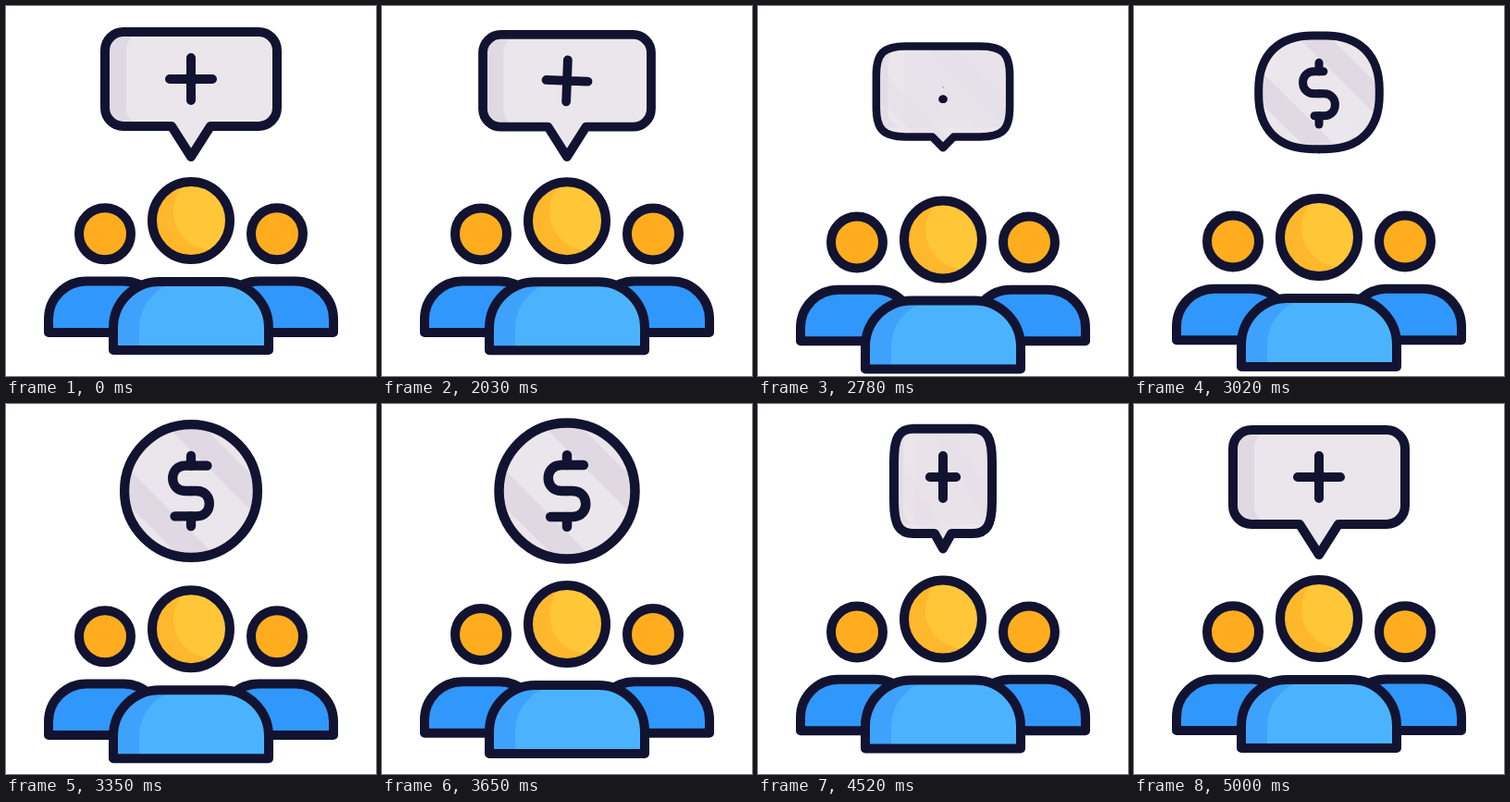
Write an HTML page with a canvas that moves like this. It is 400 by 400 pixels and loops after 5030 ms.

```html
<!DOCTYPE html>
<html lang="en">
<head>
<meta charset="utf-8">
<title>Crowd funding icon</title>
<style>
  html, body { margin: 0; width: 100%; height: 100%; overflow: hidden; background: #fff; }
  canvas { display: block; width: 400px; height: 400px; }
</style>
</head>
<body>
<canvas id="stage"></canvas>
<script>
const LOOP = 5030, REST = 2000, STEP = 30, EDGE_ON = 2325;
const INK = '#121331', PALE = '#ebe6ec', SHADE = '#e0d9e4';
const canvas = document.getElementById('stage');
const ctx = canvas.getContext('2d');
const dpr = window.devicePixelRatio || 1;
canvas.width = canvas.height = 400 * dpr;

const mix = (a, b, u) => a + (b - a) * u;
const smooth = u => u * u * (3 - 2 * u);
const easeOut = u => 1 - (1 - u) * (1 - u);

// cubic-bezier(x1, 0, x2, 1)
function settle(u, x1 = 0.38, x2 = 0.2) {
  let lo = 0, hi = 1, k = 0.5;
  for (let i = 0; i < 24; i++) {
    k = (lo + hi) / 2;
    const x = 3 * (1 - k) ** 2 * k * x1 + 3 * (1 - k) * k * k * x2 + k ** 3;
    if (x < u) lo = k; else hi = k;
  }
  return smooth(k);
}

// keys: [time, value, easing towards this key]
function track(keys, t) {
  if (t <= keys[0][0]) return keys[0][1];
  for (let i = 1; i < keys.length; i++) {
    const [t0, v0] = keys[i - 1], [t1, v1, ease = smooth] = keys[i];
    if (t <= t1) return mix(v0, v1, ease((t - t0) / (t1 - t0)));
  }
  return keys[keys.length - 1][1];
}

const DROP = [[0, 0], [540, 21], [3000, 0, settle]];
const SCALE = [[0, 1], [120, 0.95, easeOut], [540, 1.07], [780, 0.85],
               [1500, 1.05], [1650, 1.05], [2160, 1]];
const ROUND = [[540, 0], [1140, 1], [2200, 1], [2700, 0]];
const TILT = [[0, 0], [120, 5, easeOut], [540, -4.7], [800, -45], [810, 0]];
const PLUS = [[560, 1], [800, 0], [2300, 0], [EDGE_ON, 1]];
const TRIM = [[760, 0], [1110, 1]];
const TURN = [[1650, 0], [3000, Math.PI]];

function outline(path, width = 10) {
  ctx.lineWidth = width;
  ctx.strokeStyle = INK;
  ctx.stroke(path);
}

function part(path, fill, light, lightFill) {
  ctx.fillStyle = fill;
  ctx.fill(path);
  if (light) {
    ctx.save();
    ctx.clip(path);
    ctx.fillStyle = lightFill;
    ctx.fill(light);
    ctx.restore();
  }
  outline(path);
}

function disc(x, y, r) {
  const p = new Path2D();
  p.arc(x, y, r, 0, Math.PI * 2);
  return p;
}

const torso = (x0, x1, top, bottom, r) => new Path2D(
  `M${x0} ${bottom}V${top + r}A${r} ${r} 0 0 1 ${x0 + r} ${top}H${x1 - r}` +
  `A${r} ${r} 0 0 1 ${x1} ${top + r}V${bottom}Z`);

const sideParts = [107, 293].map(x => [disc(x, 246.3, 28), torso(x - 61, x + 61, 297.5, 353, 41)]);
const head = disc(200, 232, 42), headLight = disc(223, 222, 42);
const body = torso(116, 284, 298, 372, 50), bodyLight = torso(144, 330, 298, 372, 50);

function people(drop) {
  ctx.save();
  ctx.translate(0, drop * 0.45);
  for (const [face, chest] of sideParts) {
    part(chest, '#3097fc');
    part(face, '#ffad1f');
  }
  ctx.restore();
  ctx.save();
  ctx.translate(0, drop);
  part(body, '#3ea1fc', bodyLight, '#4bb3fd');
  part(head, '#ffb72c', headLight, '#ffc738');
  ctx.restore();
}

// Speech bubble at m = 0, coin at m = 1; x is squeezed by w around 200.
function shell(m, w) {
  const hw = mix(93, 70, m), r = mix(20, 70, m);
  const top = mix(28, 24, m), bottom = mix(130, 164, m);
  const base = mix(21, 0, m), tip = bottom + 33 * (1 - m) ** 2;
  const k = r * (1 - 0.5523 - 0.9 * m * (1 - m));
  const p = new Path2D();
  const X = x => 200 + x * w;
  const line = (x, y) => p.lineTo(X(x), y);
  const curve = (a, b, c, d, e, f) => p.bezierCurveTo(X(a), b, X(c), d, X(e), f);
  p.moveTo(X(r - hw), top);
  line(hw - r, top);
  curve(hw - k, top, hw, top + k, hw, top + r);
  line(hw, bottom - r);
  curve(hw, bottom - k, hw - k, bottom, hw - r, bottom);
  line(base, bottom);
  line(0, tip);
  line(-base, bottom);
  line(r - hw, bottom);
  curve(k - hw, bottom, -hw, bottom - k, -hw, bottom - r);
  line(-hw, top + r);
  curve(-hw, top + k, k - hw, top, r - hw, top);
  p.closePath();
  return p;
}

function shading(path, m, w) {
  ctx.fillStyle = PALE;
  ctx.fill(path);
  ctx.save();
  ctx.clip(path);
  ctx.translate(200, 94);
  ctx.scale(w, 1);
  ctx.fillStyle = SHADE;
  ctx.globalAlpha = 1 - m;
  ctx.beginPath();
  ctx.rect(-100, -70, 50, 106);
  ctx.roundRect(-70, -66, 190, 102, 20);
  ctx.rect(-50, -70, 0, 0);
  ctx.fill('evenodd');
  ctx.fillStyle = PALE;
  ctx.beginPath();
  ctx.roundRect(-70, -66, 190, 102, 20);
  ctx.fill();
  ctx.beginPath();
  ctx.rect(-40, 30, 80, 60);
  ctx.fill();
  ctx.globalAlpha = m;
  ctx.fillStyle = SHADE;
  ctx.rotate(Math.PI / 4);
  ctx.fillRect(-100, -57, 200, 27);
  ctx.fillRect(-100, 30, 200, 27);
  ctx.restore();
}

function plus(size, tilt, w) {
  const a = tilt * Math.PI / 180, c = 23 * size * Math.cos(a), s = 23 * size * Math.sin(a);
  const p = new Path2D();
  for (const [x, y] of [[c, s], [-s, c]]) {
    p.moveTo(200 - x * w, 79 - y);
    p.lineTo(200 + x * w, 79 + y);
  }
  outline(p, 10 * Math.min(1, size * 2));
}

function dollar(trim, w) {
  const r = 13.3, bar = 37 * Math.min(1, trim * 1.25);
  for (const d of [1, -1]) {
    const X = x => 200 + d * x * w, Y = y => 94 + d * y;
    const k = r * 4 / 3;
    const half = new Path2D();
    half.moveTo(X(0), Y(0));
    half.lineTo(X(6), Y(0));
    half.bezierCurveTo(X(6 + k), Y(0), X(6 + k), Y(2 * r), X(6), Y(2 * r));
    half.lineTo(X(-17), Y(2 * r));
    if (trim < 1) ctx.setLineDash([71 * trim, 999]);
    outline(half);
    ctx.setLineDash([]);
    if (bar > 2 * r) {
      const stem = new Path2D();
      stem.moveTo(200, Y(2 * r));
      stem.lineTo(200, Y(bar));
      outline(stem);
    }
  }
}

function sign(t) {
  const s = track(SCALE, t), m = track(ROUND, t);
  const w = Math.max(0.02, Math.abs(Math.cos(track(TURN, t))));
  const anchor = mix(163, 94, m);
  ctx.save();
  ctx.translate(200, anchor);
  ctx.scale(s, s);
  ctx.translate(-200, -anchor);
  const path = shell(m, w);
  shading(path, m, w);
  outline(path);
  const size = track(PLUS, t), trim = track(TRIM, t);
  if (size > 0 && (t < 800 || t >= EDGE_ON)) plus(size, track(TILT, t), w);
  if (trim > 0 && t < EDGE_ON) dollar(trim, w);
  ctx.restore();
}

const start = performance.now();
function draw() {
  const now = Math.max(0, performance.now() - start) % LOOP;
  const t = Math.max(0, Math.floor((now - REST) / STEP) * STEP);
  ctx.setTransform(dpr, 0, 0, dpr, 0, 0);
  ctx.fillStyle = '#fff';
  ctx.fillRect(0, 0, 400, 400);
  ctx.lineCap = ctx.lineJoin = 'round';
  people(track(DROP, t));
  sign(t);
  requestAnimationFrame(draw);
}
draw();
</script>
</body>
</html>
```
